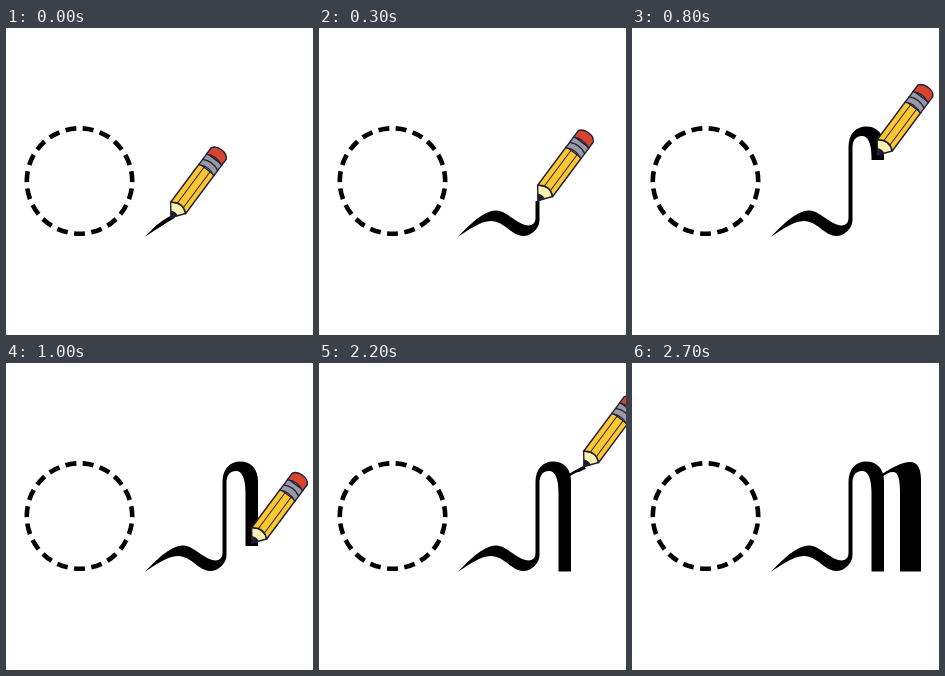
Animation, 307 px wide and 307 px high, one loop 4700 ms. Source, as an HTML page:

```html
<!DOCTYPE html>
<html lang="en">
<head>
<meta charset="utf-8">
<title>Letter stroke order</title>
<style>
  html, body { margin: 0; width: 100%; height: 100%; overflow: hidden; background: #fff; }
  svg { display: block; width: 100vw; height: 100vh; }
  .guide { fill: none; stroke: #000; stroke-width: 4.6; stroke-dasharray: 63 37; }
  .reveal { fill: none; stroke: #fff; stroke-linejoin: round; }
  #pencil { stroke: #1f1f38; stroke-width: 1.4; stroke-linejoin: round; stroke-linecap: round; }
</style>
</head>
<body>
<svg viewBox="0 0 307 307">
  <defs>
    <mask id="m1" maskUnits="userSpaceOnUse" x="0" y="0" width="307" height="307">
      <path id="reveal1" class="reveal"/>
    </mask>
    <mask id="m2" maskUnits="userSpaceOnUse" x="0" y="0" width="307" height="307">
      <path id="reveal2" class="reveal"/>
    </mask>
  </defs>

  <!-- 19 dashes, one centred at the bottom -->
  <circle class="guide" cx="73.5" cy="153" r="52.7" pathLength="1900"
          stroke-dashoffset="31.5" transform="rotate(90 73.5 153)"/>

  <path mask="url(#m1)" d="M138.5 209C150 198 163 183 177 182.5C187 182 198 197 210 197.5
    Q216.500 197 216.500 190V119C216.500 106 224 98.5 234 98.5C245 98.5 252 106 252 118V208.5H239.500
    V130C239.500 115 236 108 230 108C224 108 220.500 112 220.500 120V192
    C220.500 200 213 208 204 208C193 208 185 193 172 193C161 193 150 202 138.500 209Z"/>
  <path mask="url(#m2)" d="M250 111C261 104 270 99 278 99C286 99 289 106 289 117V208.5H268
    V130C268 115 266 109 261 109C257 109 254 111 250 114Z"/>

  <!-- drawn upright with its tip at the origin -->
  <g id="pencil">
    <path fill="#fdf2ae" d="M0 0L-9.400 -12Q0 -20 9.400 -12Z"/>
    <path fill="#1f1f38" d="M0 0L-3.600 -5Q0 -7 3.600 -5Z"/>
    <path fill="#fdc72f" d="M-9.400 -12Q0 -20 9.400 -12V-60H-9.400Z"/>
    <path fill="none" stroke-width="1" d="M-3.500 -15.500V-60M4 -15.500V-60"/>
    <path fill="#9a9aa4" d="M-9.400 -59Q0 -64 9.400 -59V-73H-9.400Z"/>
    <path fill="none" d="M-9.400 -65.500Q0 -70.500 9.400 -65.500"/>
    <path fill="#d8452f" d="M-9.400 -72Q0 -77 9.400 -72V-80Q7 -84.500 0 -84.500Q-7 -84.500 -9.400 -80Z"/>
  </g>
</svg>
<script>
  const LOOP = 4700, STEP = 100, LIFT = 12, RESUME = 13, RESUME_AT = 2200, LAST = 18;
  const HAIRLINE = 4, FULL = 28;
  const $ = id => document.getElementById(id);

  // Each step adds one piece of pen path; x, y is where the tip ends up.
  const first = [
    ["M136 211Q152 197 168 188", 165, 189.5],
    ["Q178 184 187 190", 187, 190],
    ["Q196 203 206 203", 206, 202],
    ["Q219 203 219 173", 219, 172.5],
    ["V147", 219, 146],
    ["V119", 219, 119],
    ["Q219 104 229.5 103", 228.5, 102.5],
    ["Q241 102 244 112", 241, 108],
    ["Q246 120 246 132", 245.5, 127],
    ["V158", 246, 154],
    ["V183", 246, 180],
    ["V207", 246, 205],
    ["V214"]
  ];
  const second = [
    ["M249 112L266 104", 265, 103.5],
    ["Q277 100 278.500 114", 279, 109],
    ["V145", 279, 142],
    ["V176", 279, 174],
    ["V207", 279, 205],
    ["V214"]
  ];
  const pen = [...first, ...second];

  function stepAt(t) {
    if (t < RESUME_AT) return Math.min(LIFT, Math.floor(t / STEP));
    return Math.min(LAST, RESUME + Math.floor((t - RESUME_AT) / STEP));
  }

  // A stroke starts as a hairline and gets its full weight from the second piece on.
  function reveal(path, pieces, count) {
    path.setAttribute("d", pieces.slice(0, count).map(p => p[0]).join("") || "M0 0");
    path.style.strokeWidth = count < 2 ? HAIRLINE : FULL;
  }

  function draw(step) {
    reveal($("reveal1"), first, step + 1);
    reveal($("reveal2"), second, Math.max(0, step - LIFT));
    const [, x, y] = pen[step];
    const down = x !== undefined;
    $("pencil").style.display = down ? "" : "none";
    if (down) $("pencil").setAttribute("transform", `translate(${x} ${y}) rotate(36.7)`);
  }

  let shown = -1;
  function tick() {
    const step = stepAt(performance.now() % LOOP);
    if (step !== shown) draw(shown = step);
    requestAnimationFrame(tick);
  }
  tick();
</script>
</body>
</html>
```
